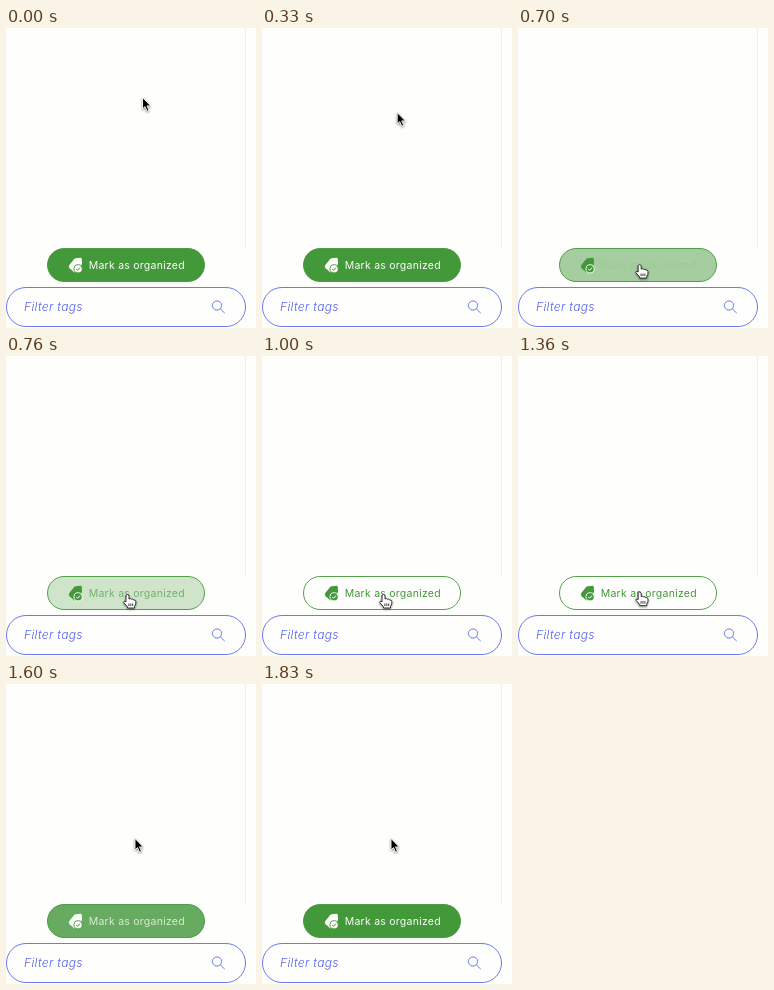
An HTML page that plays this animation: 250 by 300 pixels, repeating every 2 s.

```html
<!DOCTYPE html>
<html lang="en">
<head>
<meta charset="utf-8">
<title>Mark as organized</title>
<style>
  html, body { margin: 0; width: 100%; height: 100%; overflow: hidden; background: #fefefc; }
  svg { display: block; width: 250px; height: 300px; font-family: Inter, "Open Sans", sans-serif; }
  #cursor { filter: drop-shadow(0 1px 1px #0007); }
</style>
</head>
<body>
<svg viewBox="0 0 250 300">
  <path d="M239.5 0V220" stroke="#efeff2"/>

  <g fill="none" stroke="#5b6cee" stroke-width=".9">
    <rect x=".5" y="259.5" width="239" height="39" rx="19.5"/>
    <circle cx="211" cy="277.5" r="4.6"/>
    <path d="M214.4 280.9L218.8 285.2"/>
    <text x="18" y="283.3" font-size="12" font-style="italic" font-weight="300" letter-spacing=".35" fill="#5061ea" stroke="none">Filter tags</text>
  </g>

  <rect id="button" x="41.5" y="220.5" width="157" height="33" rx="16.5" stroke="#43983a" stroke-width=".9"/>
  <g id="icon">
    <path fill="currentColor" d="M63.3 237.1L68.2 231Q68.8 230.3 69.7 230.2L74.4 229.8Q75.6 229.8 75.8 231L76 235.4Q76 236.2 75.5 236.9L70 243.8Q69 244.8 67.9 244L63.6 240.2Q62.2 238.8 63.3 237.1Z"/>
    <circle cx="72.1" cy="240.8" r="4.1" fill="currentColor" stroke="var(--inverse)" stroke-width=".9"/>
    <path d="M70.2 240.9L71.6 242.3 74.2 239.4" fill="none" stroke="var(--inverse)"/>
  </g>
  <text id="label" x="82.7" y="240.7" font-size="10.5" letter-spacing=".25">Mark as organized</text>

  <g id="cursor" stroke-linejoin="round">
    <path id="arrow" fill="#000" stroke="#fff" stroke-width=".9" d="M.5 .5V12L3 9.6 5.1 14.2 7 13.3 5 8.9H8.7Z"/>
    <path id="hand" fill="#fff" stroke="#222" stroke-width=".9" d="M-1.5 1.4Q0-.5 1.5 1.4V5Q3 4 4 5.3 5.5 4.6 6.3 6 8 5.6 8.3 7.3V10L7 12.5V14H0V12.8L-3.9 8.5Q-4 6.4-1.5 7.8Z M1.4 9.5V12M3.3 9.5V12M5.2 9.5V12"/>
  </g>
</svg>
<script>
  const $ = id => document.getElementById(id);
  const LOOP = 2000, STEP = 1000 / 30, FADE = 460;
  const ENTER = 560, LEAVE = 1366;
  const GREEN = [67, 152, 58], WHITE = [254, 254, 252];
  const START = [136, 69], PRESS = [121.5, 238], REST = [128.5, 154];

  const clamp = u => Math.min(1, Math.max(0, u));
  const lerp = (a, b, u) => a.map((v, i) => v + (b[i] - v) * u);
  const rgb = c => `rgb(${c.map(Math.round)})`;

  // CSS-style cubic-bezier timing, solved by bisection
  const bezier = (x1, y1, x2, y2) => u => {
    const at = (a, b, s) => 3 * a * s * (1 - s) ** 2 + 3 * b * s * s * (1 - s) + s ** 3;
    if (u <= 0 || u >= 1) return clamp(u);
    let lo = 0, hi = 1;
    for (let i = 0; i < 24; i++) {
      const mid = (lo + hi) / 2;
      if (at(x1, x2, mid) < u) lo = mid; else hi = mid;
    }
    return at(y1, y2, lo);
  };
  const ease = bezier(.25, .1, .25, 1);
  const approach = bezier(.43, 0, .29, 1);
  const retreat = bezier(.65, 0, .35, 1);

  function draw(t) {
    const hover = t > ENTER + 10 && t < LEAVE + 10;
    const fade = t < LEAVE ? ease((t - ENTER) / FADE) : 1 - ease((t - LEAVE) / FADE);
    $('button').setAttribute('fill', rgb(lerp(GREEN, WHITE, fade)));
    $('label').setAttribute('fill', rgb(lerp(WHITE, GREEN, fade)));
    $('icon').style.color = rgb(hover ? GREEN : WHITE);
    $('icon').style.setProperty('--inverse', rgb(hover ? WHITE : GREEN));

    const [x, y] = t < 1300
      ? lerp(START, PRESS, approach((t - 233) / 533))
      : lerp(PRESS, REST, retreat((t - 1333) / 200));
    const pointing = y > 211;
    $('hand').style.display = pointing ? '' : 'none';
    $('arrow').style.display = pointing ? 'none' : '';
    $('cursor').setAttribute('transform', `translate(${x} ${y})`);
  }

  // Motion advances at 30 steps a second, on 10 ms ticks
  function tick() {
    const t = performance.now() % LOOP;
    draw(Math.floor((Math.floor(t / 10) * 10 + 9.9) / STEP) * STEP);
    requestAnimationFrame(tick);
  }
  tick();
</script>
</body>
</html>
```
